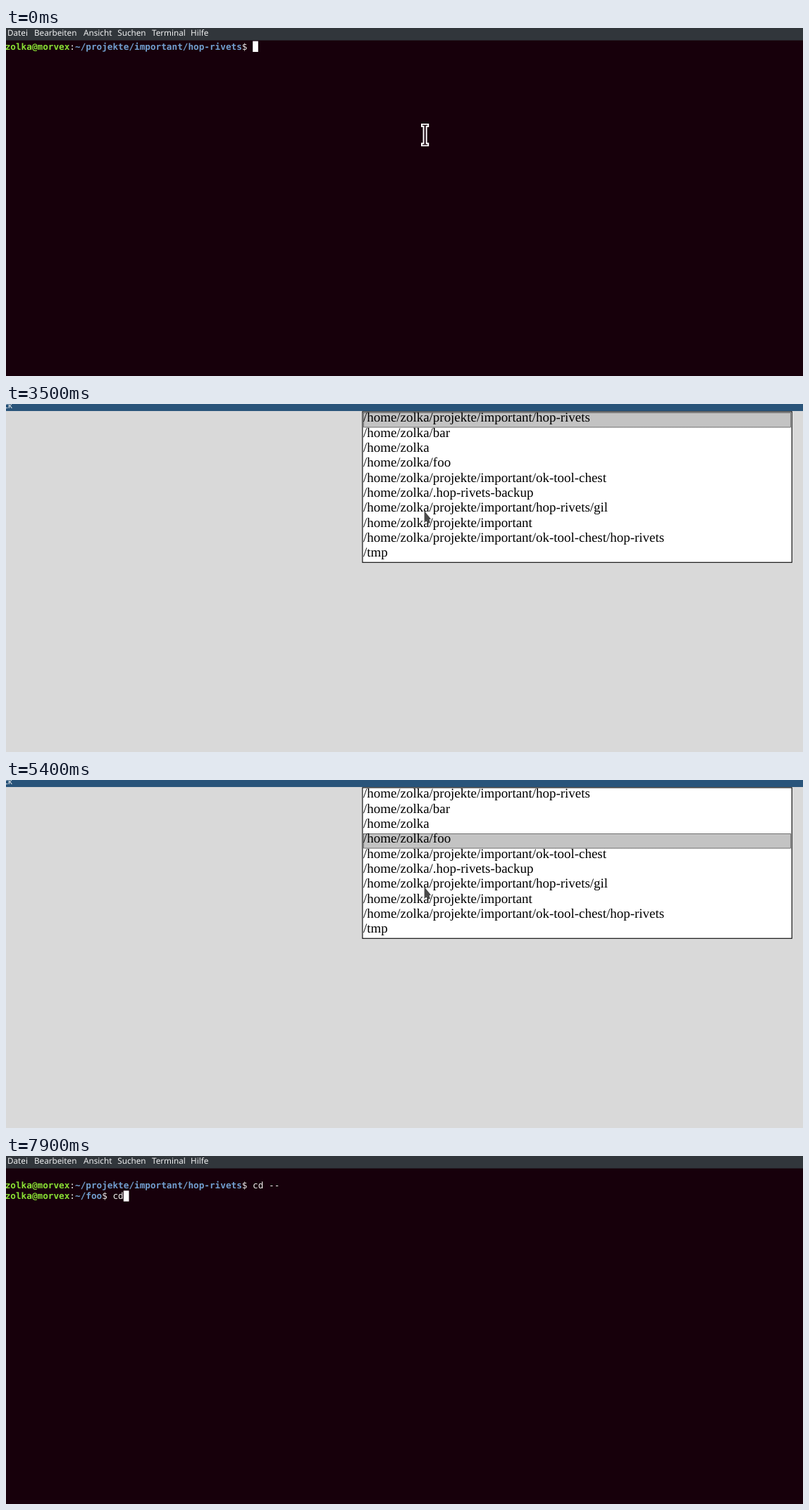
An HTML page that plays this animation: 1131 by 495 pixels, repeating every 8 s.

```html
<!DOCTYPE html>
<html lang="de">
<head>
<meta charset="utf-8">
<title>Terminal</title>
<style>
  html, body { margin: 0; width: 100%; height: 100%; overflow: hidden; background: #17000b; }
  svg { display: block; width: 1131px; height: 495px; }
  text { white-space: pre; text-rendering: geometricPrecision; }
  .menu { font: 11.7px "Noto Sans", sans-serif; fill: #eff0f1; }
  .term { font: 12.69px "DejaVu Sans Mono", monospace; fill: #eeeeec; }
  .host { font-weight: bold; fill: #8ae234; }
  .path { font-weight: bold; fill: #729fcf; }
  .list { font: 18.96px "Liberation Serif", serif; fill: #000; }
</style>
</head>
<body>
<svg viewBox="0 0 1131 495">
  <g id="terminal">
    <rect width="1131" height="495" fill="#17000b"/>
    <rect width="1131" height="17.6" fill="#31363b"/>
    <g id="menu" class="menu"></g>
    <g id="lines" class="term"></g>
    <rect id="cursor" width="7.7" height="15.3" fill="#fff"/>
    <g id="beam" fill="none">
      <path d="M589 138.4h11.2M589 165.8h11.2" stroke="#fff" stroke-width="5"/>
      <path d="M594.6 137v30" stroke="#fff" stroke-width="6"/>
      <path d="M591 138.4h7.2M591 165.8h7.2" stroke="#17000b" stroke-width="1.3"/>
      <path d="M594.6 138v28" stroke="#17000b" stroke-width="2.2"/>
    </g>
  </g>
  <g id="picker">
    <rect width="1131" height="495" fill="#d9d9d9"/>
    <rect width="1131" height="10" fill="#29547a"/>
    <text class="menu" x="-2.8" y="5.5">ck</text>
    <rect x="505.9" y="10.9" width="609.3" height="214.4" fill="#fff" stroke="#000" stroke-width="1.1"/>
    <rect id="mark" x="507.5" width="606" height="20.6" fill="#c3c3c3" stroke="#000" stroke-dasharray="1 1"/>
    <g id="entries" class="list"></g>
    <path d="M593.6 152V169l3.6-3.4 2.8 4.2 2-1-1.4-4.6 2.4-.8Z" fill="#4a4a4a"/>
  </g>
</svg>
<script>
const LOOP = 8000;
const LEFT = -1.3, TOP = 18.7, COL = 7.64, ROW = 15.3;
const ITEM = 21.3;

const $ = id => document.getElementById(id);

function addText(parent, x, y, parts) {
  const ns = "http://www.w3.org/2000/svg";
  const el = document.createElementNS(ns, "text");
  el.setAttribute("x", x);
  el.setAttribute("y", y);
  for (const [str, cls = ""] of parts) {
    const span = document.createElementNS(ns, "tspan");
    span.setAttribute("class", cls);
    span.textContent = str;
    el.append(span);
  }
  parent.append(el);
  return el;
}

const prompt = dir => [["zolka@morvex", "host"], [":"], [dir, "path"], ["$ "], [""]];

[["Datei", 2], ["Bearbeiten", 40], ["Ansicht", 110], ["Suchen", 158.3], ["Terminal", 207], ["Hilfe", 262]]
  .forEach(([label, x]) => addText($("menu"), x, 11, [[label]]));

const home = "/home/zolka", work = home + "/projekte/important";
[
  work + "/hop-rivets",
  home + "/bar",
  home,
  home + "/foo",
  work + "/ok-tool-chest",
  home + "/.hop-rivets-backup",
  work + "/hop-rivets/gil",
  work,
  work + "/ok-tool-chest/hop-rivets",
  "/tmp"
].forEach((dir, i) => addText($("entries"), 507, 25.4 + i * ITEM, [[dir]]));

const first = addText($("lines"), LEFT, 0, prompt("~/projekte/important/hop-rivets"));
const second = addText($("lines"), LEFT, 0, prompt("~/foo"));

// Each track lists [start time, value]; a value holds until the next one.
const screens = [[0, "terminal"], [3500, "picker"], [5700, "terminal"]];
const typedFirst = [[0, ""], [1300, "c"], [1400, "cd"], [1700, "cd "], [2200, "cd -"], [2300, "cd --"]];
const typedSecond = [[0, ""], [7900, "cd"]];
const firstRow = [[0, 0], [5700, 1]];
const secondShown = [[0, false], [5800, true]];
const beamShown = [[0, true], [1300, false], [5700, true], [7900, false]];
const selected = [[0, 0], [4600, 1], [5100, 2], [5400, 3]];
const cursorCell = [
  [0, [46, 0]], [500, null], [1100, [46, 0]],
  [1300, [47, 0]], [1400, [48, 0]], [1700, [49, 0]], [2200, [50, 0]], [2300, [51, 0]],
  [3000, null], [3100, [0, 1]],
  [5700, [0, 2]], [5800, [20, 2]], [6400, null], [7000, [20, 2]], [7600, null],
  [7900, [22, 2]]
];

const at = (track, t) => track.findLast(([start]) => start <= t)[1];
const show = (el, on) => { el.style.display = on ? "" : "none"; };
const baseline = row => TOP + row * ROW + 11.8;

function draw(t) {
  const screen = at(screens, t);
  show($("terminal"), screen === "terminal");
  show($("picker"), screen === "picker");

  first.setAttribute("y", baseline(at(firstRow, t)));
  first.lastChild.textContent = at(typedFirst, t);
  second.setAttribute("y", baseline(2));
  second.lastChild.textContent = at(typedSecond, t);
  show(second, at(secondShown, t));
  show($("beam"), at(beamShown, t));

  const cell = at(cursorCell, t);
  show($("cursor"), cell);
  if (cell) {
    $("cursor").setAttribute("x", LEFT + cell[0] * COL);
    $("cursor").setAttribute("y", TOP + cell[1] * ROW);
  }
  $("mark").setAttribute("y", Math.round(12 + at(selected, t) * ITEM) + 0.5);
}

const begin = performance.now();
function tick() {
  draw((performance.now() - begin) % LOOP);
  requestAnimationFrame(tick);
}
tick();
</script>
</body>
</html>
```
